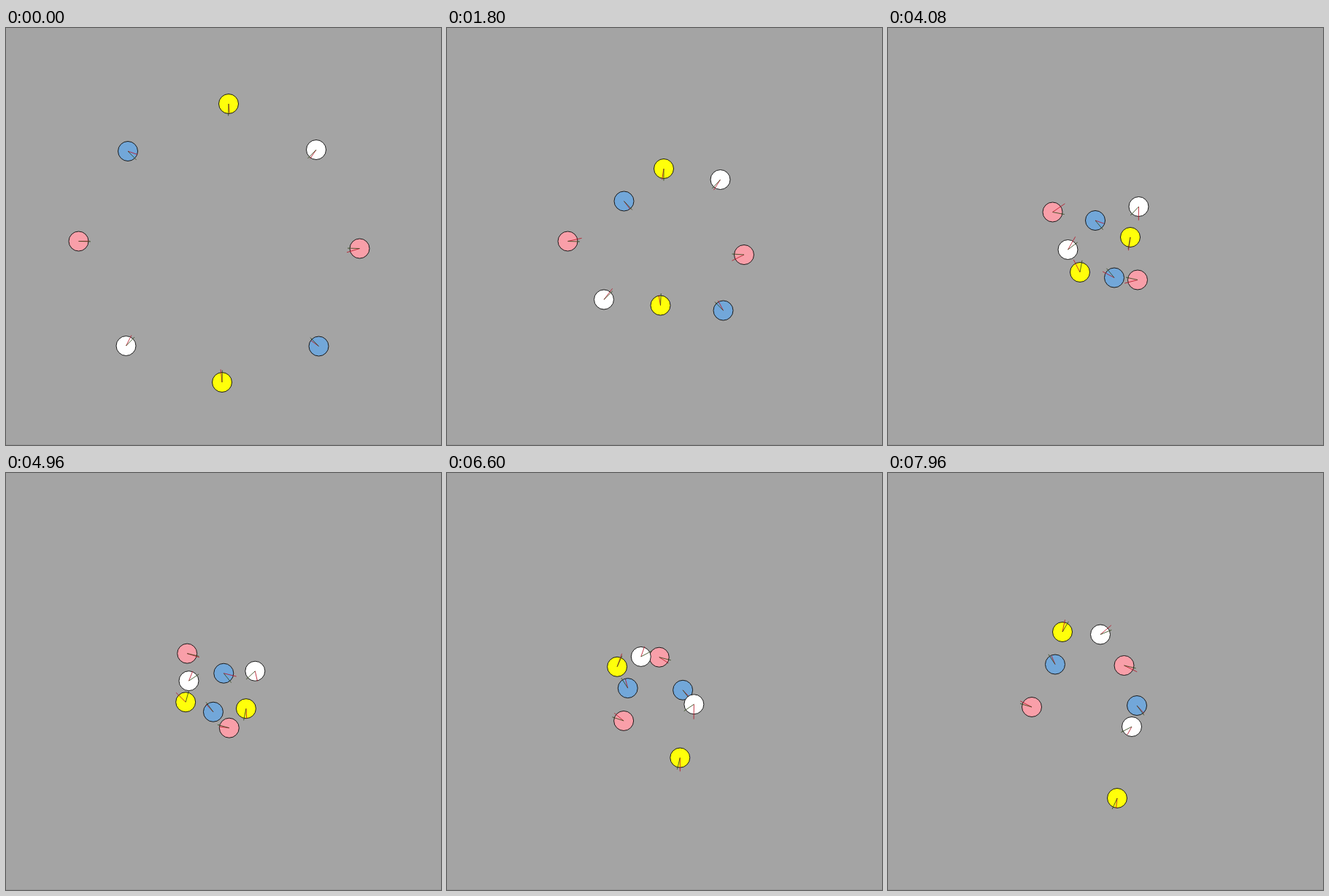
These frames come from a looping animation (596x572 px, 8000 ms). An HTML page with a canvas:

```html
<!DOCTYPE html>
<html lang="en">
<head>
<meta charset="utf-8">
<title>Crossing agents</title>
<style>
  html, body { margin: 0; width: 100%; height: 100%; overflow: hidden; background: #a4a4a4; }
  canvas { display: block; }
</style>
</head>
<body>
<canvas id="stage" width="596" height="572"></canvas>
<script>
const ctx = document.getElementById('stage').getContext('2d');
const LOOP = 8000, STEP = 40, RADIUS = 13.5, REACH = 16.5;
const TIMES = [0, 1800, 2800, 4080, 5840, 7960];
const BLUE = '#72a7d9', PINK = '#f99fa9', YELLOW = '#ffff0a', WHITE = '#ffffff';
const agents = [];

// Waypoints are the x, y pairs passed at TIMES.
function agent(color, ...xy) {
  const path = TIMES.map((t, i) => [t, xy[2 * i], xy[2 * i + 1]]);
  agents.push({ color, path });
}

// Agents come in opposite pairs, each heading for the other's start.
agent(BLUE, 167, 169, 242.5, 237.5, 267.5, 250.5, 284, 264, 312.5, 286.5, 341, 319);
agent(BLUE, 428.5, 436.5, 378.5, 387.5, 346, 368, 310, 342.5, 261, 312, 229, 262.5);
agent(PINK, 99.5, 292.5, 165.5, 292.5, 203, 279.5, 225.5, 252.5, 272, 248.5, 323.5, 264);
agent(PINK, 484.5, 302.5, 407, 311, 378.5, 322.5, 342, 345.5, 269, 347.5, 197, 321);
agent(YELLOW, 305, 104, 297, 193, 313.5, 236, 332, 287, 322.5, 359.5, 314, 446);
agent(YELLOW, 296, 486, 292.5, 380.5, 285, 361.5, 263, 335, 234, 290.5, 239, 218);
agent(WHITE, 425, 167, 374.5, 208, 357.5, 218, 343.5, 245, 340.5, 298.5, 334, 348);
agent(WHITE, 164.5, 436, 215, 372.5, 219.5, 348.5, 246.5, 304, 254.5, 268.5, 291, 221.5);

function slope(path, i, axis) {
  const a = path[Math.max(0, i - 1)], b = path[Math.min(path.length - 1, i + 1)];
  return (b[axis] - a[axis]) / (b[0] - a[0]);
}

// Smooth cubic through the waypoints.
function placeAt(path, t) {
  let i = 0;
  while (i < path.length - 2 && t >= path[i + 1][0]) i++;
  const a = path[i], b = path[i + 1], span = b[0] - a[0], u = (t - a[0]) / span;
  return [1, 2].map(axis => {
    const m = slope(path, i, axis) * span, n = slope(path, i + 1, axis) * span;
    return a[axis] + u * (m + u * (3 * (b[axis] - a[axis]) - 2 * m - n
      + u * (2 * (a[axis] - b[axis]) + m + n)));
  });
}

// Seeded random number from -1 to 1.
function noise(n) {
  const s = Math.sin(n * 12.9898) * 43758.5453;
  return 2 * (s - Math.floor(s)) - 1;
}

function ray(x, y, angle, length, color) {
  ctx.strokeStyle = color;
  ctx.beginPath();
  ctx.moveTo(x, y);
  ctx.lineTo(x + length * Math.cos(angle), y + length * Math.sin(angle));
  ctx.stroke();
}

function drawAgent({ color, path }, i, t) {
  const [x, y] = placeAt(path, t), [px, py] = placeAt(path, t - STEP);
  const [, goalX, goalY] = agents[i ^ 1].path[0];
  const seed = t / STEP + i * 251;

  ctx.beginPath();
  ctx.arc(x, y, RADIUS, 0, 2 * Math.PI);
  ctx.fillStyle = color;
  ctx.fill();
  ctx.strokeStyle = '#1a1a1a';
  ctx.stroke();

  // Red: flickering velocity. Green: the way to the goal.
  const heading = Math.atan2(y - py, x - px) + 0.4 * noise(seed);
  ray(x, y, heading, REACH + 4 * noise(seed + 2111), 'rgba(184, 24, 42, 0.85)');
  ray(x, y, Math.atan2(goalY - y, goalX - x), REACH, 'rgba(52, 72, 28, 0.85)');
}

function draw(now) {
  const t = Math.floor((now % LOOP) / STEP) * STEP;
  ctx.fillStyle = '#a4a4a4';
  ctx.fillRect(0, 0, 596, 572);
  ctx.fillStyle = '#999';
  ctx.fillRect(0, 571, 596, 1);
  agents.forEach((a, i) => drawAgent(a, i, t));
}

const start = performance.now();
function tick() {
  draw(performance.now() - start);
  requestAnimationFrame(tick);
}
tick();
</script>
</body>
</html>
```
